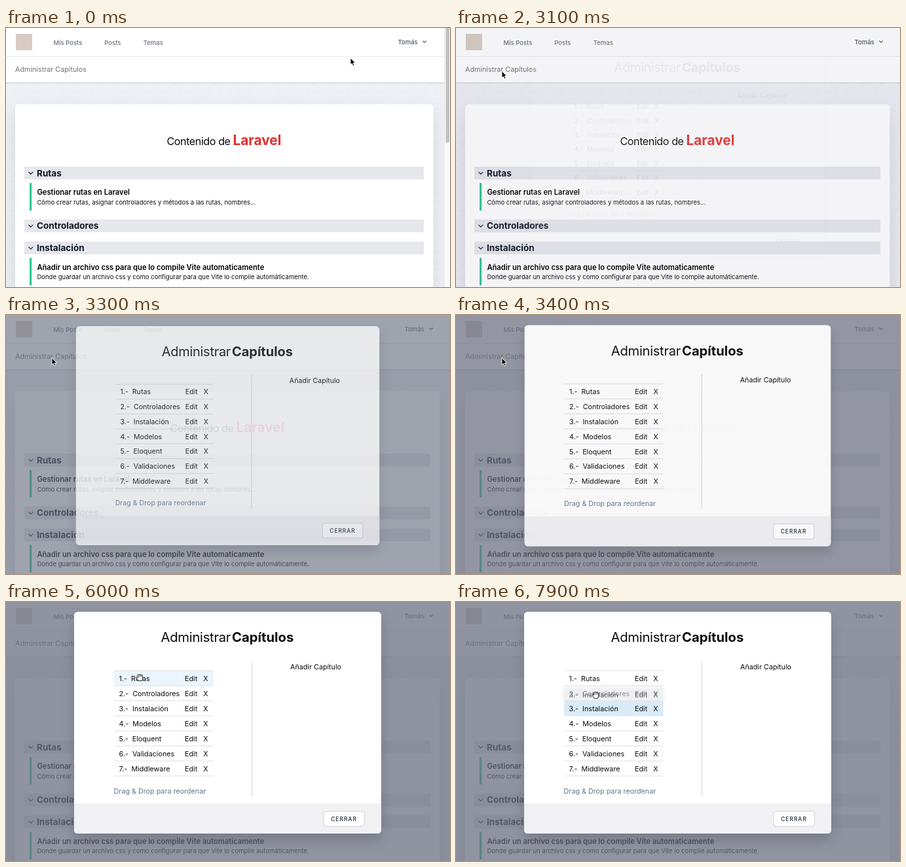
These frames come from a looping animation (678 px wide and 396 px high, 8 s). An HTML page:

```html
<!DOCTYPE html>
<html lang="es">
<head>
<meta charset="utf-8">
<title>Administrar Capítulos</title>
<style>
html, body { margin: 0; width: 100%; height: 100%; overflow: hidden; background: #fff; }
svg { display: block; width: 678px; height: 396px; font-family: Inter, sans-serif; }
text { white-space: pre; fill: #0b0c10; }
.nav { font-size: 9.5px; font-weight: 500; fill: #6b7280; }
.body { font-size: 10.75px; }
.note { font-size: 9.54px; }
.head { font-size: 11.2px; font-weight: 600; fill: #000; }
.bar { font-size: 13.55px; font-weight: 700; fill: #111827; }
.big { font-size: 20.25px; letter-spacing: -.014em; }
.bold { font-weight: 700; letter-spacing: 0; }
.title { font-size: 16.2px; letter-spacing: -.029em; }
.topic { font-size: 20.8px; font-weight: 700; fill: #e32d2d; }
.button { font-size: 8.4px; font-weight: 600; letter-spacing: 1px; fill: #374151; }
.chevron { fill: none; stroke: #1f2937; stroke-width: 1.2; stroke-linecap: round; stroke-linejoin: round; }
#card { filter: drop-shadow(0 12px 12px rgba(30, 35, 60, .13)); }
#dialog { filter: drop-shadow(0 10px 9px rgba(0, 0, 0, .16)); }
#header { filter: drop-shadow(0 1px 1px rgba(0, 0, 0, .14)); }
.cursor path { stroke-linejoin: round; stroke-linecap: round; }
</style>
</head>
<body>
<svg viewBox="0 0 678 396">
  <defs>
    <pattern id="facets" width="30" height="26" patternUnits="userSpaceOnUse">
      <path d="M0 4L9 0L18 7L30 4M18 7L13 18L0 4M13 18L30 21L18 7M13 18L9 26M30 21L24 26M0 21L13 18"
            fill="none" stroke="#e8e9ef" stroke-width=".7"/>
    </pattern>
    <filter id="soft" x="-10%" y="-40%" width="120%" height="180%"><feGaussianBlur stdDeviation="2.5"/></filter>
  </defs>

  <g id="page">
    <rect width="678" height="396" fill="#eff0f5"/>
    <rect width="678" height="396" fill="url(#facets)"/>
    <rect id="header" x="-5" y="-5" width="690" height="88" fill="#fff"/>
    <path d="M0 43.5H678" stroke="#e8eaee"/>
    <rect x="15" y="9" width="25" height="25" fill="#d8cbc4"/>
    <text class="nav" x="72.5" y="25.6">Mis Posts</text>
    <text class="nav" x="150.3" y="25.6">Posts</text>
    <text class="nav" x="209.8" y="25.6">Temas</text>
    <g id="user">
      <text class="nav" x="598.5" y="25">Tomás</text>
      <path class="chevron" d="M636.6 19.8L639 22.2L641.4 19.8" style="stroke:#4b5563"/>
    </g>
    <text id="link" class="body" x="14" y="67.4">Administrar Capítulos</text>

    <rect id="card" x="14" y="116.5" height="320" rx="5" fill="#fff"/>
    <g id="heading">
      <text class="title" x="245.5" y="179">Contenido de</text>
      <text class="topic" x="346.5" y="179">Laravel</text>
    </g>
    <g id="sections"></g>
    <g fill="#2fc98f">
      <rect x="36" y="237" width="3.2" height="42"/>
      <rect x="36" y="351.5" width="3.2" height="42"/>
    </g>
    <text class="head" x="47.4" y="255">Gestionar rutas en Laravel</text>
    <text class="note" x="47.4" y="270">Cómo crear rutas, asignar controladores y métodos a las rutas, nombres...</text>
    <text class="head" x="47.4" y="369.5">Añadir un archivo css para que lo compile Vite automaticamente</text>
    <text class="note" x="47.4" y="384">Donde guardar un archivo css y como configurar para que Vite lo compile automáticamente.</text>
  </g>

  <g id="scrollbar">
    <rect x="669" width="9" height="396" fill="#fafafa"/>
    <path d="M669.5 0V396" stroke="#e7e7e9"/>
    <rect x="671.5" y="-5" width="5.6" height="180.5" rx="2.8" fill="#c1c1c2"/>
  </g>

  <rect id="shade" width="678" height="396" fill="#6b7080"/>

  <g id="modal">
    <rect id="dialog" x="104" y="15" width="469" height="339" rx="5.5" fill="#fff"/>
    <path d="M104 308H573V348.5a5.5 5.5 0 0 1-5.5 5.5H109.5a5.5 5.5 0 0 1-5.5-5.5Z" fill="#f1f1f4"/>
    <text class="big" x="236.5" y="61.4">Administrar</text>
    <text class="big bold" x="345" y="61.4">Capítulos</text>
    <path d="M375.5 90.5V297" stroke="#d3d6db"/>
    <text class="body" x="473" y="103" text-anchor="middle">Añadir Capítulo</text>
    <rect id="hover" x="165" width="151.5" height="22.6"/>
    <g id="rows"></g>
    <text class="body" x="164.6" y="292.8" style="fill:#64748b">Drag &amp; Drop para reordenar</text>
    <rect x="485" y="320" width="62.4" height="23" rx="4" fill="#fff" stroke="#cdd1d8"/>
    <text class="button" x="496.2" y="334.8">CERRAR</text>
    <g id="ghost">
      <rect x="163" y="151" width="155" height="22" fill="#e4e6ea" opacity=".62" filter="url(#soft)"/>
    </g>
  </g>

  <g id="arrow" class="cursor">
    <path d="M0 0V10.2L2.3 8.1L3.9 11.8L5.8 11L4.2 7.4H7.3Z" fill="#000" stroke="#fff" stroke-width=".9"/>
  </g>
  <g id="hand" class="cursor">
    <path d="M-1.2 .9Q0-.6 1.1 .9V4.2Q2.3 3.3 3 4.6Q4.2 3.8 4.8 5.1Q6.1 4.8 6.2 6.4V8.6Q6 10.2 5.2 12H-.2Q-1.4 9.5-3.6 7.4Q-3.8 5.6-2.4 6L-1.2 7Z"
          fill="#fff" stroke="#111" stroke-width=".9"/>
    <path d="M1.2 8V10M2.9 8V10M4.5 8V10" stroke="#111" stroke-width=".6"/>
  </g>
  <g id="grab" class="cursor">
    <path d="M-3.2-3.2Q-2.3-4.7-1.2-3.7Q-.2-5.2 .9-3.9Q2.1-4.8 2.9-3.4Q4.8-3.5 4.7-1.5V1.2Q4.5 3.2 3.4 5.4H-1.8Q-2.8 3.3-4.8 1.5Q-5.2-.3-3.6-.1L-2.7 .5Z"
          fill="#fff" stroke="#111" stroke-width=".9"/>
    <path d="M-1.2-3.4V-.8M.9-3.6V-.8M2.9-3.1V-.8" stroke="#111" stroke-width=".7" fill="none"/>
  </g>
</svg>

<script>
const LOOP = 8000, STEP = 100, ROW_TOP = 105, ROW_H = 23;
const $ = id => document.getElementById(id);
const set = (id, attrs) => Object.entries(attrs).forEach(([k, v]) => $(id).setAttribute(k, v));
const show = (id, on) => { $(id).style.display = on ? '' : 'none'; };
const add = (id, markup) => $(id).insertAdjacentHTML('beforeend', markup);
const shift = (x, y = 0) => `translate(${x} ${y})`;

// [time, x, y]
const path = [
  [0, 526, 46], [100, 450, 52], [200, 330, 60], [300, 220, 66], [400, 145, 68],
  [500, 114, 67], [900, 114, 67], [1300, 46, 67], [1800, 71, 67], [2900, 71, 67],
  [3000, 70, 66], [4300, 70, 66], [4400, 73, 70], [5200, 113, 93], [5700, 204, 115],
  [6200, 204, 115], [7000, 213, 163], [7500, 213, 163], [7900, 213, 142]
];
// [time, dialog progress, shade progress]
const fade = [[3000, 0, 0], [3100, .06, .1], [3200, .28, .39], [3300, .76, .86], [3400, .94, .97], [3500, 1, 1]];

function sample(keys, t) {
  const i = keys.findIndex(k => k[0] > t);
  if (i < 0) return keys.at(-1).slice(1);
  if (i === 0) return keys[0].slice(1);
  const a = keys[i - 1], b = keys[i], p = (t - a[0]) / (b[0] - a[0]);
  return a.slice(1).map((v, n) => v + (b[n + 1] - v) * p);
}

const rowText = (name, i) => {
  const y = 120.6 + i * ROW_H;
  return `<text class="body" x="172.6" y="${y}">${i + 1}.-\u00a0\u00a0${name}</text>
    <text class="body" x="273" y="${y}">Edit</text><text class="body" x="301.3" y="${y}">X</text>`;
};

const names = ['Rutas', 'Controladores', 'Instalación', 'Modelos', 'Eloquent', 'Validaciones', 'Middleware'];
for (let i = 0; i <= names.length; i++) {
  const y = ROW_TOP + i * ROW_H;
  add('rows', `<path d="M165 ${y}H316.5" stroke="#d9dce1" stroke-width=".9"/>`);
}
names.forEach((name, i) => add('rows', rowText(name, i)));
add('ghost', `<g opacity=".55">${rowText(names[2], 2)}</g>`);

[['Rutas', 212], ['Controladores', 292.8], ['Instalación', 326.5]].forEach(([name, y]) => add('sections',
  `<rect class="strip" x="28" y="${y}" height="19.5" fill="#e6e7eb"/>
   <path class="chevron" d="M34.6 ${y + 8.3}L37.8 ${y + 11.5}L41 ${y + 8.3}"/>
   <text class="bar" x="47" y="${y + 14.6}">${name}</text>`));

function render(t) {
  const [x, y] = sample(path, t), [p, dim] = sample(fade, t);
  const open = t >= 3000, wide = open ? 10 : 0;

  show('scrollbar', !open);
  set('user', { transform: shift(wide) });
  set('heading', { transform: shift(wide / 2) });
  set('card', { width: 638.5 + wide });
  document.querySelectorAll('.strip').forEach(s => s.setAttribute('width', 610 + wide));
  $('user').firstElementChild.style.fill = t < 200 || (t >= 3000 && t < 3300) ? '#4b5563' : '#6b7280';

  const onLink = t >= 500 && !open;
  $('link').style.fill = onLink ? '#1f2937' : '#6b7280';

  set('shade', { opacity: dim * .75 });
  const s = .95 + .05 * p;
  set('modal', { opacity: p, transform: `translate(338.5 184.5) scale(${s}) translate(-338.5 -184.5)` });
  show('modal', p > 0);

  const dragging = t >= 7600, onRow = t >= 5600;
  const row = dragging ? 2 : Math.floor((y - ROW_TOP) / ROW_H);
  show('hover', onRow && row >= 0);
  set('hover', { y: ROW_TOP + row * ROW_H, fill: dragging ? '#d9ebf8' : '#ebf5fe' });
  show('ghost', dragging);
  set('ghost', { transform: shift(0, y - 163) });

  const cursor = onLink ? 'hand' : onRow ? 'grab' : 'arrow';
  for (const id of ['arrow', 'hand', 'grab']) {
    show(id, id === cursor);
    set(id, { transform: shift(x, y) });
  }
}

const start = performance.now();
function tick() {
  const t = (performance.now() - start) % LOOP;
  render(Math.floor(t / STEP) * STEP);
  requestAnimationFrame(tick);
}
tick();
</script>
</body>
</html>
```
